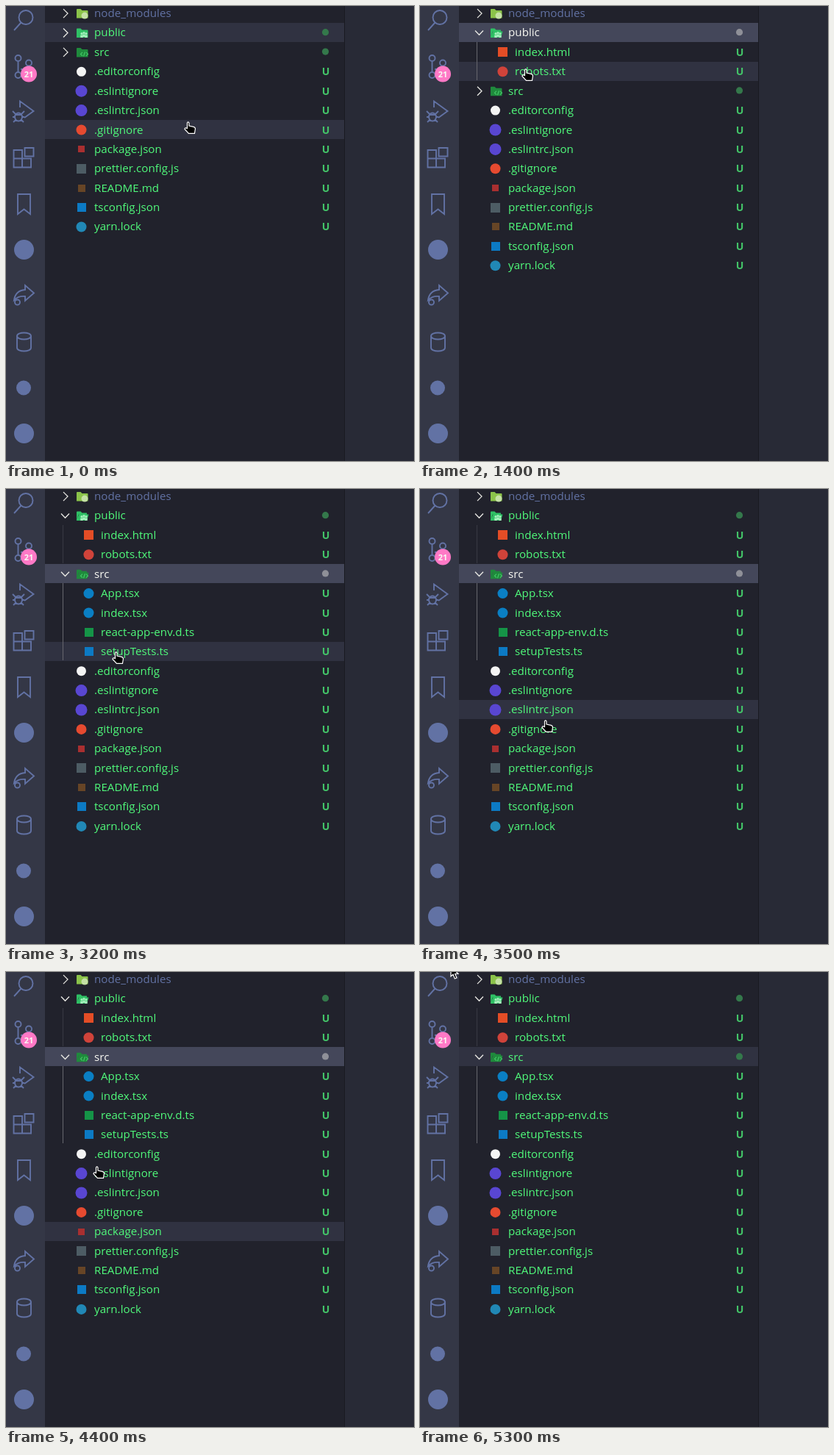
Animation of 555 by 619 pixels, one loop 5500 ms. Source, as an HTML page with a canvas:

```html
<!DOCTYPE html>
<html lang="en">
<head>
<meta charset="utf-8">
<title>File explorer</title>
<style>
  html, body { margin: 0; width: 100%; height: 100%; overflow: hidden; background: #282a36; }
  canvas { display: block; }
</style>
</head>
<body>
<canvas width="555" height="619"></canvas>
<script>
const ctx = document.querySelector('canvas').getContext('2d');
const LOOP = 5500, STEP = 100, ROW = 26.4, TOP = -3.1;
const GREEN = '#50fa7b', MUTED = '#6272a4', WHITE = '#f8f8f2';
const FONT = '"Open Sans", "Noto Sans", sans-serif';

// Folders: name, colour, glyph. Files: name, icon shape, colour, size.
const nodeModules = { name: 'node_modules', color: '#8bc34a', glyph: 'dot', text: MUTED };
const publicDir = { name: 'public', color: '#2fc065', glyph: 'people', openAt: 1000 };
const srcDir = { name: 'src', color: '#1f8a3c', glyph: 'code', openAt: 2400 };
const file = (name, shape, color, size) => ({ name, shape, color, size });
publicDir.children = [
  file('index.html', 'square', '#e44d26', 13),
  file('robots.txt', 'circle', '#d0433a', 14)
];
srcDir.children = [
  file('App.tsx', 'circle', '#0a7fc4', 14),
  file('index.tsx', 'circle', '#0a7fc4', 14),
  file('react-app-env.d.ts', 'square', '#159447', 12),
  file('setupTests.ts', 'square', '#0c7ac4', 12)
];
const rootFiles = [
  file('.editorconfig', 'circle', '#f4f4f4', 13),
  file('.eslintignore', 'circle', '#5946d2', 16),
  file('.eslintrc.json', 'circle', '#5946d2', 16),
  file('.gitignore', 'circle', '#e64a30', 14),
  file('package.json', 'square', '#a92f30', 9),
  file('prettier.config.js', 'square', '#4d5c64', 13),
  file('README.md', 'square', '#674526', 10),
  file('tsconfig.json', 'square', '#0c7ac4', 12),
  file('yarn.lock', 'circle', '#2188b6', 14)
];

// Pointer path: time, x, y.
const path = [
  [0, 242, 157], [200, 242, 157], [700, 140, 45], [1200, 140, 45],
  [1400, 138, 85], [1700, 132, 127], [1800, 132, 127], [2100, 121, 119],
  [2900, 121, 119], [3200, 144, 221], [3500, 165, 314], [3800, 174, 417],
  [4100, 176, 460], [4200, 172, 477], [4300, 150, 346], [4400, 118, 264],
  [4700, 50, 15], [4900, 38, 0], [5300, 42, -7], [5500, 42, -7]
];

function pointer(t) {
  const i = path.findIndex(p => p[0] > t);
  const [t0, x0, y0] = path[i - 1], [t1, x1, y1] = path[i];
  const k = (t - t0) / (t1 - t0);
  return [Math.round(x0 + (x1 - x0) * k), Math.round(y0 + (y1 - y0) * k)];
}

function rect(x, y, w, h, color) {
  ctx.fillStyle = color;
  ctx.fillRect(x, y, w, h);
}

function disc(x, y, r, color) {
  ctx.fillStyle = color;
  ctx.beginPath();
  ctx.arc(x, y, r, 0, 7);
  ctx.fill();
}

function stroke(d, color, width) {
  ctx.strokeStyle = color;
  ctx.lineWidth = width;
  ctx.stroke(new Path2D(d));
}

function fill(d, color) {
  ctx.fillStyle = color;
  ctx.fill(new Path2D(d));
}

function text(s, x, y, color, font, align = 'left') {
  ctx.fillStyle = color;
  ctx.font = `${font} ${FONT}`;
  ctx.textAlign = align;
  ctx.fillText(s, x, y);
}

function at(x, y, draw) {
  ctx.save();
  ctx.translate(x, y);
  draw();
  ctx.restore();
}

function activityBar() {
  rect(0, 0, 53, 619, '#343746');
  const icons = [
    'M36.5 15.5a9.5 9.5 0 1 1-19 0a9.5 9.5 0 1 1 19 0M20.5 22.5L11 33',
    'M20.5 71a4 4 0 1 1-8 0a4 4 0 1 1 8 0M35 77.500a4 4 0 1 1-8 0a4 4 0 1 1 8 0' +
      'M20.500 94a4 4 0 1 1-8 0a4 4 0 1 1 8 0M16.500 75V90M31 81.500Q30 86 20 86',
    'M19 138V129.500L37.500 143L25 152M22 151a5 5.500 0 1 1-10 0a5 5.500 0 1 1 10 0' +
      'M12 148H22M9 143L13 147M25 143L21 147M9 151H12M22 151H25M10 158L13 155M24 158L21 155',
    'M10.500 196H22V219.500H10.500ZM10.500 207.500H34V219.500H22M25.500 193H37.500V204.500H25.500Z',
    'M16 256H33V283L24.500 276.500L16 283Z',
    'M26 386V380L38 390.500L26 401V395Q17 394 11 400Q13 387 26 386Z' +
      'M19 403a3.500 3.500 0 1 1-7 0a3.500 3.500 0 1 1 7 0',
    'M15 449V465C15 471 34 471 34 465V449M34 449C34 455 15 455 15 449C15 443 34 443 34 449'
  ];
  icons.forEach(d => stroke(d, MUTED, 1.9));
  disc(24.5, 331.5, 13.5, MUTED);
  disc(24, 519.5, 10, MUTED);
  disc(24.5, 581.5, 13.5, MUTED);
  disc(31, 92.5, 11, '#ff79c6');
  text('21', 31, 96.5, WHITE, 'bold 11px', 'center');
}

function folderIcon(item, y, open) {
  at(95, y - 7, () => {
    fill(open ? 'M1 12V2Q1 1 2 1H6.500L8.500 3H15V5H4L1 12L4.500 5H17.500L15 13.500H1Z'
              : 'M1 2Q1 1 2 1H6.500L8.500 3H15.500Q16.500 3 16.500 4V13.500H1Z', item.color);
    if (item.glyph === 'dot') disc(12, 10, 4.5, '#c5e1a5');
    if (item.glyph === 'people') {
      [[8, 8], [14, 8], [11, 7]].forEach(([x, r]) => {
        disc(x, r, 1.6, '#a5f0bd');
        rect(x - 1.7, r + 2, 3.4, 3.5, '#a5f0bd');
      });
    }
    if (item.glyph === 'code') {
      stroke('M9 7L6.500 9.500L9 12M14 7L16.500 9.500L14 12M12.500 6.500L10.500 12.500', '#43c766', 1.2);
    }
  });
}

function fileIcon({ shape, color, size }, x, y) {
  if (shape === 'circle') disc(x, y, size / 2, color);
  else rect(Math.round(x - size / 2), Math.round(y - size / 2), size, size, color);
}

function visibleRows(t) {
  const expand = dir => [dir, ...(t >= dir.openAt ? dir.children : [])];
  return [nodeModules, ...expand(publicDir), ...expand(srcDir), ...rootFiles];
}

function drawRow(item, i, t, selected, hovered) {
  const top = Math.floor(TOP + i * ROW), y = TOP + (i + .5) * ROW;
  const active = selected && t >= 900 && t < 5100;
  if (selected || hovered) {
    rect(53, top, 407, Math.floor(TOP + (i + 1) * ROW) - top, active ? '#44475a' : '#303241');
  }
  const nested = publicDir.children.includes(item) || srcDir.children.includes(item);
  const label = active ? WHITE : item.text || GREEN;
  text(item.name, nested ? 129 : 120, Math.round(y + 5), label, '15.2px');
  if (item.shape) {
    fileIcon(item, nested ? 112.5 : 102.5, y);
    text('U', 435, Math.round(y + 5), '#43c468', 'bold 14px', 'center');
    return;
  }
  const open = t >= item.openAt;
  at(0, y, () => stroke(open ? 'M75 -3L80.500 2.800L86 -3' : 'M78 -6L84 0L78 6', '#e9e9e4', 1.3));
  folderIcon(item, y, open);
  if (item !== nodeModules) disc(434.5, y - .8, 4.6, active ? '#8f9098' : '#34784b');
}

function drawGuides(t, rows, selected) {
  [publicDir, srcDir].filter(dir => t >= dir.openAt).forEach(dir => {
    const i = rows.indexOf(dir) + 1;
    rect(77, Math.floor(TOP + i * ROW), 1, Math.floor(dir.children.length * ROW),
      dir === selected ? '#66676e' : '#383943');
  });
}

function drawPointer(t) {
  const arrow = t >= 4800;
  const d = arrow
    ? 'M0 0V13L3 10.300L5.300 16L8 15L5.600 9.500H10Z'
    : 'M4.500 9.500V2Q5.700 -.2 7 2V6L13 7.300Q15.500 8 15.500 10L14.500 16.300H6.500L1 10.500Q1.500 7.800 4.500 9.500Z';
  at(...pointer(t), () => {
    fill(d, '#000');
    stroke(d, '#fff', 1.2);
  });
}

function draw(t) {
  rect(0, 0, 555, 619, '#282a36');
  rect(53, 0, 407, 619, '#21222c');
  rect(460, 0, 1, 619, '#191a21');
  activityBar();
  const rows = visibleRows(t);
  const selected = t < 2300 ? publicDir : srcDir;
  // The hover band trails the pointer on its fast way back up.
  const [x, y] = pointer(t > 4100 ? t - STEP : t);
  const hover = x > 52 ? Math.floor((y - 1 - TOP) / ROW) : -1;
  rows.forEach((item, i) => drawRow(item, i, t, item === selected, i === hover));
  drawGuides(t, rows, selected);
  drawPointer(t);
}

function frame(now) {
  draw(Math.floor(now % LOOP / STEP) * STEP);
  requestAnimationFrame(frame);
}
requestAnimationFrame(frame);
</script>
</body>
</html>
```
